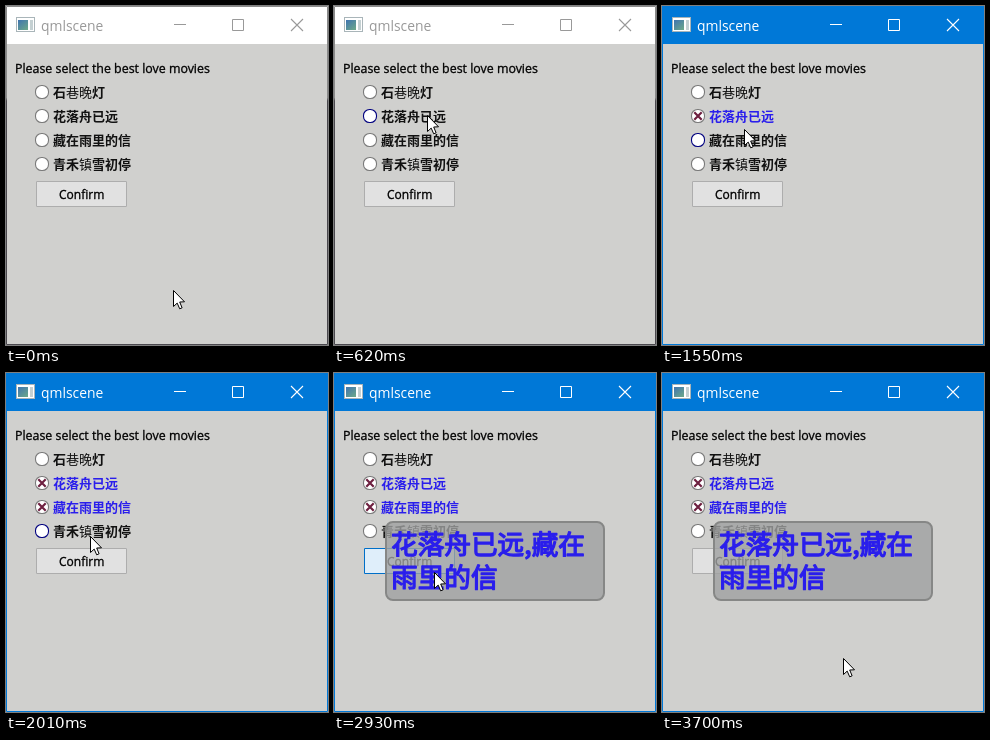
Write an HTML page with a canvas that moves like this. It is 322x339 px and loops after 3780 ms.

```html
<!DOCTYPE html>
<html lang="en">
<head>
<meta charset="utf-8">
<title>qmlscene</title>
<style>
  html, body { margin: 0; width: 100%; height: 100%; overflow: hidden; background: #d0d0ce; }
  canvas { display: block; width: 322px; height: 339px; }
</style>
</head>
<body>
<canvas id="stage"></canvas>
<script>
const W = 322, H = 339, LOOP = 3780, STEP = 230 / 3;
const LATIN = '"Open Sans", "Noto Sans", sans-serif';
const CJK = '"Noto Sans CJK SC", "Noto Sans CJK JP", "Noto Sans CJK", sans-serif';
const BLUE = '#2a1eec', ACCENT = '#0078d7';
const ACTIVATE = 850, POPUP = 2700;
const ROW_TOP = 86, ROW_GAP = 24;

const rows = [
  { text: '石巷晚灯', thin: '巷晚' },
  { text: '花落舟已远', thin: '', checkedAt: 940 },
  { text: '藏在雨里的信', thin: '', checkedAt: 1780 },
  { text: '青禾镇雪初停', thin: '镇' }
];

// Each move of the pointer: when it runs and where it ends.
const origin = { x: 167, y: 284 };
const moves = [
  { from: 0, to: 536, x: 87, y: 115 },
  { from: 536, to: 613, x: 93, y: 109 },
  { from: 1040, to: 1393, x: 91, y: 129 },
  { from: 1470, to: 1623, x: 73, y: 116 },
  { from: 1776, to: 2006, x: 84, y: 163 },
  { from: 2006, to: 2313, x: 78, y: 183 },
  { from: 2773, to: 2926, x: 100, y: 199 },
  { from: 2926, to: 3310, x: 139, y: 242 },
  { from: 3469, to: 3693, x: 181, y: 285 }
];

const tones = {
  rest: { fill: [225, 225, 225], edge: [173, 173, 173] },
  hover: { fill: [229, 241, 251], edge: [0, 120, 215] },
  press: { fill: [204, 228, 247], edge: [0, 84, 153] }
};

const canvas = document.getElementById('stage');
const dpr = window.devicePixelRatio || 1;
canvas.width = Math.round(W * dpr);
canvas.height = Math.round(H * dpr);
const ctx = canvas.getContext('2d');

const ramp = (t, from, to) => Math.min(1, Math.max(0, (t - from) / (to - from)));
const smooth = p => p * p * (3 - 2 * p);
const mix = (a, b, p) => a.map((v, i) => v + (b[i] - v) * p);
const rgb = v => `rgb(${v.map(Math.round).join(',')})`;

// The picture is refreshed about 13 times a second.
function snap(t) {
  const shift = t < 940 ? 0 : 13;
  return Math.floor((t - shift) / STEP) * STEP + shift;
}

function pointerAt(t) {
  let { x, y } = origin;
  for (const m of moves) {
    const p = smooth(ramp(t, m.from, m.to));
    x += (m.x - x) * p;
    y += (m.y - y) * p;
  }
  return [Math.round(x), Math.round(y)];
}

function rect(x, y, w, h, fill) {
  ctx.fillStyle = fill;
  ctx.fillRect(x, y, w, h);
}

function frame(x, y, w, h, color) {
  ctx.strokeStyle = color;
  ctx.lineWidth = 1;
  ctx.strokeRect(x + 0.5, y + 0.5, w - 1, h - 1);
}

function cross(x, y, r, width, color) {
  ctx.strokeStyle = color;
  ctx.lineWidth = width;
  ctx.beginPath();
  for (const s of [-1, 1]) {
    ctx.moveTo(x - r, y - r * s);
    ctx.lineTo(x + r, y + r * s);
  }
  ctx.stroke();
}

function label(text, x, y, font, color, extra = 0) {
  ctx.font = font;
  ctx.fillStyle = color;
  ctx.fillText(text, x, y);
  if (extra) {
    ctx.strokeStyle = color;
    ctx.lineWidth = extra;
    ctx.lineJoin = 'round';
    ctx.strokeText(text, x, y);
  }
}

function drawIcon() {
  rect(10, 11, 19, 15, '#a9b5b9');
  rect(11, 12, 17, 13, '#fff');
  const g = ctx.createLinearGradient(12, 14, 20, 24);
  g.addColorStop(0, '#3f74b0');
  g.addColorStop(1, '#6aa58c');
  rect(12, 14, 10, 10, g);
  rect(24, 14, 3, 10, '#c4d0d2');
}

function drawWindow(active) {
  rect(0, 0, W, H, '#d0d0ce');
  rect(0, 0, W, 38, active ? ACCENT : '#fff');
  let edge = ACCENT;
  if (!active) {
    edge = ctx.createLinearGradient(0, 0, 0, H);
    edge.addColorStop(0.27, '#8a8a8a');
    edge.addColorStop(0.28, '#4a484e');
  }
  frame(0, 0, W, H, edge);
  drawIcon();
  const ink = active ? '#fff' : '#999';
  label('qmlscene', 35, 25, `13.9px ${LATIN}`, ink);
  rect(168, 18, 12, 1, ink);
  frame(226, 13, 12, 12, ink);
  cross(291, 19, 6, 1.1, ink);
}

function drawRow(row, y, hovered, checked) {
  ctx.beginPath();
  ctx.roundRect(29.5, y - 6.5, 13, 13, 6);
  ctx.fillStyle = '#fff';
  ctx.fill();
  ctx.strokeStyle = hovered ? '#00007f' : '#7a7a7a';
  ctx.lineWidth = 1.1;
  ctx.stroke();
  if (checked) cross(36, y, 3.7, 2.2, '#6e2040');
  [...row.text].forEach((c, i) => {
    const weight = row.thin.includes(c) ? 400 : 700;
    label(c, 47 + i * 13, y + 5, `${weight} 13px ${CJK}`, checked ? BLUE : '#111');
  });
}

function drawButton(t) {
  const hover = ramp(t, 2180, 2400) - ramp(t, 2970, 3240);
  const press = ramp(t, 2490, 2620) - ramp(t, 2700, 3000);
  const tone = part => rgb(mix(mix(tones.rest[part], tones.hover[part], hover), tones.press[part], press));
  rect(30, 175, 91, 26, tone('fill'));
  frame(30, 175, 91, 26, tone('edge'));
  label('Confirm', 53, 193, `12px ${LATIN}`, '#000', 0.3);
}

function drawPopup() {
  ctx.beginPath();
  ctx.roundRect(52, 149, 218, 78, 7);
  ctx.fillStyle = 'rgba(160,162,162,0.8)';
  ctx.fill();
  ctx.strokeStyle = '#868786';
  ctx.lineWidth = 2;
  ctx.stroke();
  const picked = rows.filter(r => r.checkedAt).map(r => r.text).join(',');
  [picked.slice(0, 8), picked.slice(8)].forEach((text, i) => {
    label(text, 57, 181 + i * 33, `400 26.67px ${CJK}`, BLUE, 1.3);
  });
}

function drawPointer(x, y) {
  ctx.save();
  ctx.translate(x + 0.5, y + 0.5);
  ctx.beginPath();
  ctx.moveTo(0, 0);
  for (const [px, py] of [[0, 16], [3.7, 12.6], [6.2, 18.3], [8.6, 17.3], [6.2, 11.5], [11, 11.3]]) {
    ctx.lineTo(px, py);
  }
  ctx.closePath();
  ctx.fillStyle = '#fff';
  ctx.fill();
  ctx.strokeStyle = '#000';
  ctx.lineWidth = 1;
  ctx.lineJoin = 'miter';
  ctx.stroke();
  ctx.restore();
}

function draw(t) {
  const now = snap(t);
  const [x, y] = pointerAt(now);
  const hoverRow = x < 125 ? Math.floor((y - 68) / ROW_GAP) : -1;
  ctx.setTransform(dpr, 0, 0, dpr, 0, 0);
  drawWindow(t >= ACTIVATE);
  label('Please select the best love movies', 9, 67, `12.4px ${LATIN}`, '#000', 0.3);
  rows.forEach((row, i) => drawRow(row, ROW_TOP + i * ROW_GAP, i === hoverRow, t >= row.checkedAt));
  drawButton(now);
  if (t >= POPUP) drawPopup();
  drawPointer(x, y);
}

const start = performance.now();
function tick() {
  draw((performance.now() - start) % LOOP);
  requestAnimationFrame(tick);
}
tick();
</script>
</body>
</html>
```
